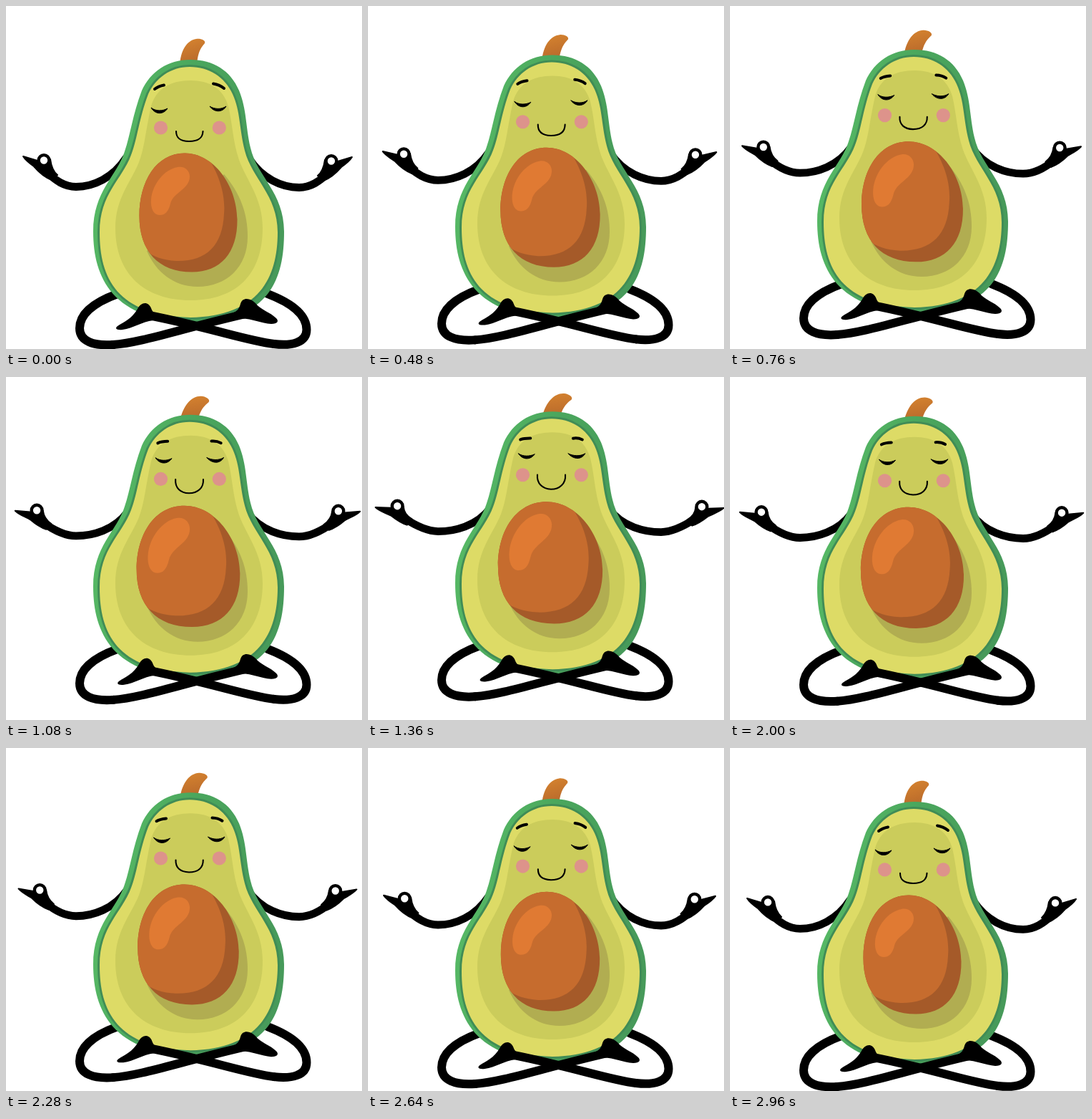
Recreate the animation shown at these times as an HTML page. Size 498 px wide and 479 px high, loop 3000 ms.

```html
<!DOCTYPE html>
<html lang="en">
<head>
<meta charset="utf-8">
<title>Meditating avocado</title>
<style>
  html, body { margin: 0; width: 100%; height: 100%; overflow: hidden; background: #fff; }
  svg { display: block; width: 498px; height: 479px; }
  .line { fill: none; stroke: #000; stroke-linecap: round; }
  .limb { stroke-width: 12; }
  .arm { stroke-width: 10.8; }
  .hand { stroke: #000; stroke-width: 2; stroke-linejoin: round; }
  .brow { stroke-width: 4; }
  .eye { stroke: #000; stroke-width: 1; stroke-linejoin: round; }
  .mouth { stroke-width: 2.1; }
  .ring { fill: #fff; stroke: #000; stroke-width: 4.4; }
  .blush { fill: #dd938b; }
  .flesh { fill: #dddb66; stroke: #408c56; stroke-width: 6; paint-order: stroke; }
</style>
</head>
<body>
<svg viewBox="0 0 498 479">
  <defs>
    <linearGradient id="skin" x1="0" y1="0" x2="1" y2=".3">
      <stop offset="0" stop-color="#5cc168"/>
      <stop offset=".5" stop-color="#4aa65d"/>
      <stop offset="1" stop-color="#479a5a"/>
    </linearGradient>
    <linearGradient id="bark" x1=".3" y1="0" x2=".6" y2="1">
      <stop offset="0" stop-color="#d5832f"/>
      <stop offset="1" stop-color="#b5662b"/>
    </linearGradient>
    <path id="pit" d="M250 205.5C290 205.5 323 250 323.5 298C324 345 300 371.5 260 371.5C213 371.5 186.5 342 186.5 293C186.5 245 210 205.5 250 205.5Z"/>
    <clipPath id="pitClip"><use href="#pit"/></clipPath>
    <g id="armShape">
      <path class="line arm" data-m="arm"/>
      <path class="hand" data-m="hand"/>
      <circle class="ring" id="ring" r="7.4"/>
    </g>
  </defs>

  <use href="#armShape"/>
  <use href="#armShape" transform="translate(508 1) scale(-1 1)"/>

  <g id="body">
    <path id="stem" fill="url(#bark)" d="M243 84C244 62 253 48 266 46C272 45 280 48 278 52C273 58 268 64 267 84Z"/>
    <path class="line limb" d="M156 402C120 415 103 432 103 450C103 468 122 475 150 473"/>
    <path class="line limb" d="M366 402C400 415 420.500 432 420.500 452C420.500 470 400 475 375 472"/>
    <path fill="url(#skin)" d="M258 75C226 75 202 92 190 118C177 152 174 180 166 203C155 238 122 258 122 315C122 380 150 440 262 442C370 440 389 380 389 315C389 260 351 238 342 198C335 168 337 145 326 118C314 90 290 75 258 75Z"/>
    <path class="flesh" d="M257 85C230 85 209 101 199 123C186 157 184 185 175 208C162 243 131 262 131 316C131 380 155 432 258 435C354 433 380 380 380 316C380 264 344 241 334 202C326 170 328 147 317 123C306 99 284 85 257 85Z"/>
    <path fill="#cbcc5b" d="M258 104C231 104 210 115 203 140C195 175 194 198 186 218C175 246 153 268 153 310C153 375 195 411 258 411C322 411 359 375 359 310C359 268 337 245 326 215C317 188 317 165 311 140C304 115 284 104 258 104Z"/>
    <path fill="#b1ad51" d="M305 235C328 262 338 290 338 322C338 365 308 392 268 392C235 392 210 372 197 342Z"/>
    <path class="line limb" d="M150 473C190 470 240 452 335 430"/>
    <path class="line limb" d="M375 472C335 467 290 450 200 432"/>
    <path id="foot" d="M156 447C165 441 176 437 184 423C189 413 199 412 203 422C205 428 208 430 216 432L206 439C190 441 178 450 163 452C154 453 152 450 156 447Z"/>
    <path d="M378 436C370 428 356 424 349 415C342 408 331 406 328 416C326 424 322 428 312 430L322 437C340 434 355 443 371 444C380 444 382 440 378 436Z"/>
  </g>

  <g id="seed">
    <use href="#pit" fill="#a55a29"/>
    <path clip-path="url(#pitClip)" fill="#c66c2e" d="M180 200L275 200C300 235 307 265 305 290C303 335 280 357 238 356C220 355 206 350 196 342L180 330Z"/>
    <path id="shine" fill="#e07a33" d="M240 225C250 223 257 230 257 238C257 256 234 260 230 276C227 288 222 292 215 292C206 292 202 282 203 270C205 248 222 228 240 225Z"/>
  </g>

  <g id="cheeks">
    <circle class="blush" cx="216.5" cy="170" r="9.6"/>
    <circle class="blush" cx="298.3" cy="170" r="9.6"/>
  </g>
  <path class="line brow" data-m="browL"/>
  <path class="line brow" data-m="browR"/>
  <path class="eye" data-m="eyeL"/>
  <path class="eye" data-m="eyeR"/>
  <path class="line mouth" data-m="mouth"/>
</svg>
<script>
const LOOP = 3000, STEP = 40;

// Each shape: pose when breathed out, pose when breathed in.
const poses = {
  arm: ['M168 212C150 240 122 252.500 98 252.500C82 252.500 68 243 60 234',
        'M171 184C152 210 120 217 98 217C80 217 62 206 50 198'],
  hand: ['M24 210L44 216L62 214C63 222 65 230 72 236L64 243C54 239 45 231 39 224C32 219 27 215 24 210Z',
         'M11 183L32 184L50 182C51 190 54 195 62 200L55 208C46 205 38 199 33 195C25 191 16 188 11 183Z'],
  browL: ['M208 116Q213 112 221 110.500', 'M213 88.500Q218 86.500 227 86.500'],
  browR: ['M290 108.500Q299 110 305 115', 'M287 86.500Q294 85.500 300 88.500'],
  eyeL: ['M203 142C209 147 219 147 226 143C220 152 209 152 203 142Z',
         'M210 108C216 112.500 226 112.500 233 109C227 117.500 216 117.500 210 108Z'],
  eyeR: ['M285 140C291 144 301 145 308 140C303 149 291 149 285 140Z',
         'M280 108C287 111.500 297 112.500 304 108C299 117 288 117 280 108Z'],
  mouth: ['M238 175C238 184 243 188.700 256 189C270 189 275 184 275.500 175',
          'M237 138C236 150 244 157.500 256 158C268 158 277 150 276 138']
};

const $ = id => document.getElementById(id);
const move = (id, value) => $(id).setAttribute('transform', value);
const mix = (a, b, u) => a + (b - a) * u;
const scaleAt = (x, y, sx, sy) => `translate(${x} ${y}) scale(${sx} ${sy}) translate(${-x} ${-y})`;

function mixPath([a, b], u) {
  const ends = b.match(/[\d.]+/g);
  let i = 0;
  return a.replace(/[\d.]+/g, n => mix(+n, +ends[i++], u).toFixed(2));
}

// Smooth rise and fall over one loop.
function breath(t) {
  const x = 1 - Math.abs(t / (LOOP / 2) - 1);
  return x * x * (3 - 2 * x) / 0.939;
}

const morphs = [...document.querySelectorAll('[data-m]')];
const ring = $('ring');

function draw(t) {
  const u = breath(t);
  for (const el of morphs) el.setAttribute('d', mixPath(poses[el.dataset.m], u));
  ring.setAttribute('cx', mix(53, 41.5, u));
  ring.setAttribute('cy', mix(215.5, 181.5, u));
  move('body', `translate(0 ${-25.7 * u})`);
  move('stem', `translate(${2 * u} ${0.6 * u}) rotate(${12 * u} 255 76)`);
  move('foot', `translate(${2.5 * u} 0)`);
  move('seed', `translate(0 ${-28 * u}) ` + scaleAt(255, 288.5, 1 + 0.065 * u, 1 + 0.024 * u));
  move('shine', scaleAt(257, 245, 1 + 0.03 * u, 1 + 0.14 * u));
  move('cheeks', `translate(0 ${-32 * u})`);
}

const start = performance.now();
function tick() {
  const t = (performance.now() - start) % LOOP;
  draw(Math.floor(t / STEP) * STEP);
  requestAnimationFrame(tick);
}
tick();
</script>
</body>
</html>
```
